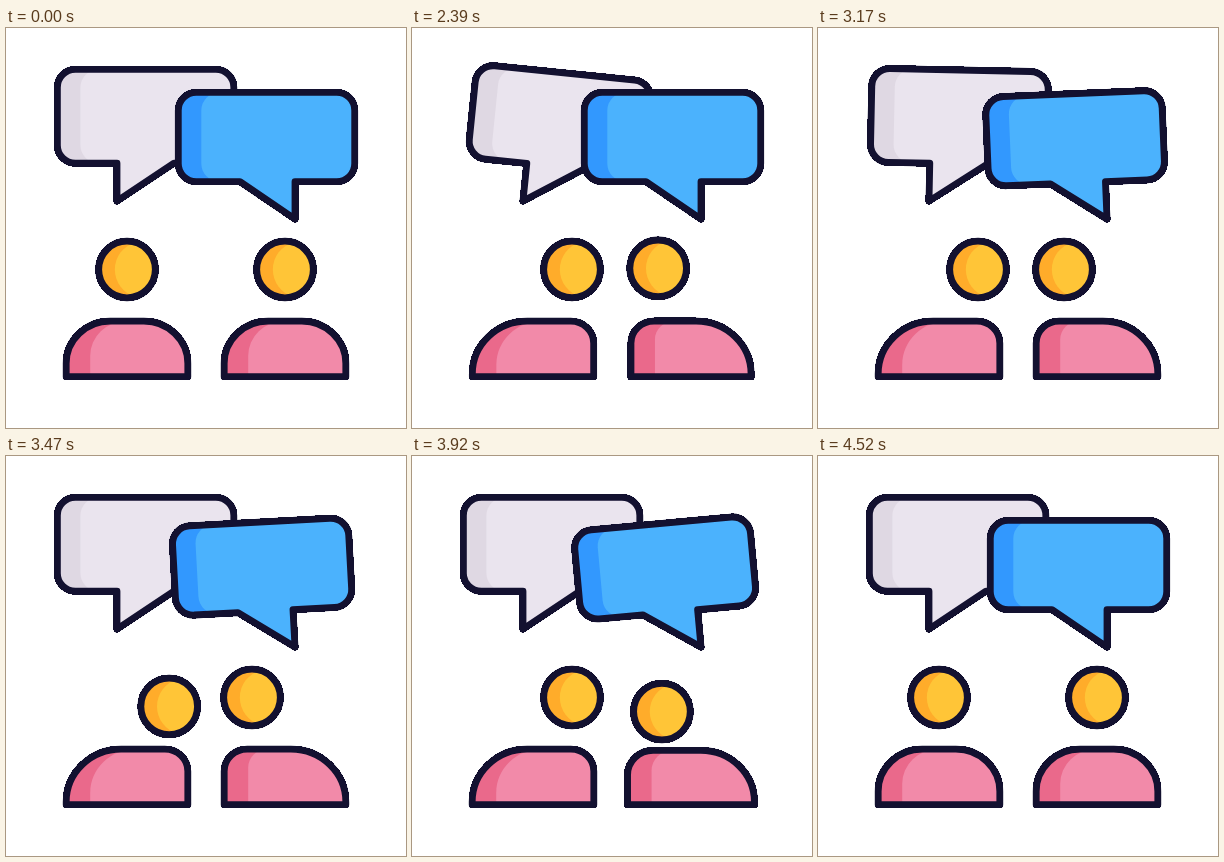
An HTML page for the animation above (4.55 s loop, 400 by 400 pixels).

```html
<!DOCTYPE html>
<html lang="en">
<head>
<meta charset="utf-8">
<title>Conversation</title>
<style>
  html, body { margin: 0; width: 100%; height: 100%; overflow: hidden; background: #fff; }
  svg { display: block; width: 100vw; height: 100vh; }
  .line, .edge { fill: none; stroke: #131130; stroke-width: 6.8; stroke-linejoin: round; }
  .edge { stroke-width: 7.2; shape-rendering: crispEdges; }
</style>
</head>
<body>
<svg id="stage" viewBox="0 0 400 400"></svg>
<script>
const LOOP = 4550, STEP = 30;
const stage = document.getElementById('stage');

function add(parent, tag, attrs) {
  const el = document.createElementNS('http://www.w3.org/2000/svg', tag);
  for (const key in attrs) el.setAttribute(key, attrs[key]);
  parent.appendChild(el);
  return el;
}

const clamp = u => Math.min(1, Math.max(0, u));
const smooth = u => u * u * (3 - 2 * u);
const cubic = u => u < 0.5 ? 4 * u ** 3 : 1 - 4 * (1 - u) ** 3;
const bump = u => Math.sin(Math.PI * clamp(u)) ** 2;

// Speech bubble: a rounded box with a tail in its bottom edge
function bubblePath(l, t, r, b, tail) {
  const c = 18, arc = `a${c} ${c} 0 0 1 `;
  return `M${l + c} ${t}H${r - c}${arc}${c} ${c}V${b - c}${arc}${-c} ${c}` +
    `${tail}H${l + c}${arc}${-c} ${-c}V${t + c}${arc}${c} ${-c}Z`;
}

function makeBubble([l, t, r, b], tail, tip, dark, light, start) {
  const g = add(stage, 'g', {});
  const d = bubblePath(l, t, r, b, tail);
  add(g, 'path', { d, class: 'edge' });
  add(g, 'path', { d, fill: dark });
  add(g, 'path', { d: bubblePath(l + 23, t, r, b, tail), fill: light });
  add(g, 'path', { d, class: 'line' });
  return ms => g.setAttribute('transform', `rotate(${swing(ms - start)} ${tip})`);
}

// Damped swing: [time, angle]
const SWING = [[0, 0], [200, -20], [490, 14.5], [690, -9], [960, 2.5], [1380, 0]];
function swing(t) {
  if (t <= 0) return 0;
  for (let i = 1; i < SWING.length; i++) {
    const [t0, a0] = SWING[i - 1], [t1, a1] = SWING[i];
    if (t < t1) return a0 + (a1 - a0) * smooth((t - t0) / (t1 - t0));
  }
  return 0;
}

// People lean towards each other, nod, and lean back
const MOVE = 400;
function dip(u) {
  return u < 0.8 ? 16 * bump(u / 0.8) : -1.2 * bump((u - 0.8) / 0.2);
}

function bodyPath(l, r, top, rl, rr) {
  const hl = rl * 0.96, hr = rr * 0.96, base = 348.7;
  return `M${l} ${base}V${top + hl}A${rl} ${hl} 0 0 1 ${l + rl} ${top}` +
    `H${r - rr}A${rr} ${hr} 0 0 1 ${r} ${top + hr}V${base}Z`;
}

function makePerson(cx, dir, lean, go, back, nodAt) {
  const edge = add(stage, 'path', { class: 'edge' });
  const dark = add(stage, 'path', { fill: '#ea698b' });
  const light = add(stage, 'path', { fill: '#f28aa9' });
  const line = add(stage, 'path', { class: 'line' });
  const head = add(stage, 'g', {});
  const R = 28.3;
  add(head, 'circle', { r: R, class: 'edge' });
  add(head, 'circle', { r: R, fill: '#ffac2a' });
  add(head, 'path', {
    d: `M8 -27.1A${R} ${R} 0 0 1 8 27.1A${R} ${R} 0 0 1 8 -27.1Z`, fill: '#ffc537'
  });
  add(head, 'circle', { r: R, class: 'line' });

  return ms => {
    const u = (ms - go) / MOVE, v = (ms - back) / MOVE;
    const p = cubic(clamp(u)) - cubic(clamp(v));
    const drop = dip(u) + dip(v);
    const nod = bump((ms - nodAt) / 320);
    const x = cx + dir * (lean * p + 3.2 * nod);
    head.setAttribute('transform', `translate(${x} ${241.5 + drop + 9 * nod})`);

    const wide = 0.7 * Math.sign(drop) * Math.sqrt(Math.abs(drop));
    const top = 293.2 + drop * 0.09;
    const l = cx - 60.8 - wide, r = cx + 60.8 + wide;
    const outer = 44 + 11 * p, inner = 44 - 21 * p;
    const [rl, rr] = dir > 0 ? [outer, inner] : [inner, outer];
    const d = bodyPath(l, r, top, rl, rr);
    for (const el of [edge, dark, line]) el.setAttribute('d', d);
    light.setAttribute('d', bodyPath(l + 24, r, top, rl * 0.82, rr));
  };
}

const parts = [
  makeBubble([51.4, 41.4, 227.8, 135.2], 'H168L111 173V135.2', '111 173',
    '#dfd8e3', '#eae4ee', 1995),
  makeBubble([172.3, 64.4, 348.7, 153.6], 'H289V191L234 153.6', '289 191',
    '#3298fe', '#4bb2fd', 3127),
  makePerson(121, 1, 39, 1995, 3950, 3320),
  makePerson(279, -1, 33, 2030, 3796, 2460)
];

function draw(ms) {
  const t = Math.floor((ms % LOOP - 20) / STEP) * STEP + 20;
  parts.forEach(update => update(t));
}

draw(0);
let begin;
function tick(now) {
  if (begin === undefined) begin = now;
  draw(now - begin);
  requestAnimationFrame(tick);
}
requestAnimationFrame(tick);
</script>
</body>
</html>
```
